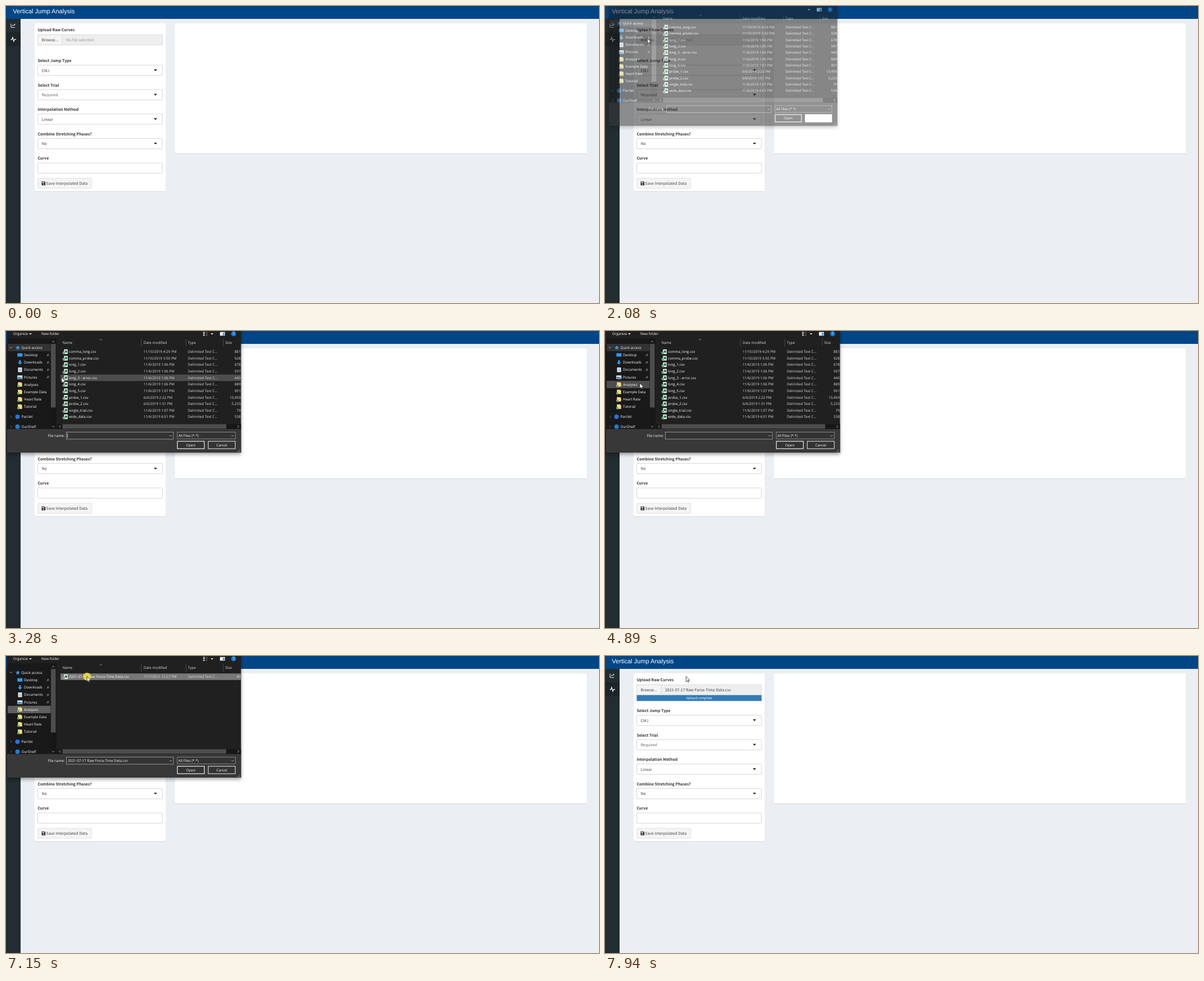
Write an HTML page that moves like this. It is 1056 by 530 pixels and loops after 8000 ms.

```html
<!DOCTYPE html>
<html lang="en">
<head>
<meta charset="utf-8">
<title>Vertical Jump Analysis</title>
<style>
html, body { margin: 0; height: 100%; overflow: hidden; background: #ebeff3; }
svg { display: block; }
text { text-rendering: geometricPrecision; white-space: pre; }
.title { font: 11.06px "Liberation Sans", Arial, sans-serif; fill: #fff; }
.form { font: 6.93px "Noto Sans CJK JP", "Noto Sans CJK SC", "Noto Sans", sans-serif; fill: #444; }
.label { font-weight: 700; fill: #333; }
.muted { fill: #999; }
.small { font-size: 5.85px; font-weight: 500; fill: #fff; }
.dlg { font: 6.3px "Open Sans", "Noto Sans", sans-serif; fill: #fff; }
.head { fill: #dedede; }
.end { text-anchor: end; }
.mid { text-anchor: middle; }
</style>
</head>
<body>
<svg id="stage" width="1056" height="530" viewBox="0 0 1056 530"></svg>
<script>
const $ = id => document.getElementById(id);
const rect = (x, y, w, h, fill, extra = '') =>
  `<rect x="${x}" y="${y}" width="${w}" height="${h}" fill="${fill}" ${extra}/>`;
const text = (x, y, str, cls, extra = '') => `<text x="${x}" y="${y}" class="${cls}" ${extra}>${str}</text>`;
const line = (d, stroke, width = 0.8, extra = '') =>
  `<path d="${d}" fill="none" stroke="${stroke}" stroke-width="${width}" ${extra}/>`;
const shape = (d, fill, extra = '') => `<path d="${d}" fill="${fill}" ${extra}/>`;
const dot = (x, y, r, fill, extra = '') => `<circle cx="${x}" cy="${y}" r="${r}" fill="${fill}" ${extra}/>`;
const group = (id, body, extra = '') => `<g id="${id}" ${extra}>${body}</g>`;
const border = c => `stroke="${c}" stroke-width=".8"`;

// Page
const card = (x, y, w, h) => rect(x, y + 1, w, h, '#d5dade', 'rx="1.5"') + rect(x, y, w, h, '#fff', 'rx="1.5"');
const select = (y, label, value, cls = '') =>
  text(56.4, y - 5.6, label, 'form label') +
  rect(56.5, y, 222, 18.4, '#fff', border('#ccc') + ' rx="1"') +
  text(63.5, y + 12, value, 'form', cls) +
  (value && shape(`M263.2 ${y + 7.5}h6l-3 3.2z`, '#222'));

const page =
  rect(0, 0, 1056, 530, '#ebeff3') +
  rect(0, 23, 26, 507, '#222d32') + rect(0, 47, 26, 24.5, '#1c2529') +
  rect(0, 0, 1056, 23, '#004687') +
  text(12.3, 13, 'Vertical Jump Analysis', 'title') +
  line('M8.8 31.5V38.3H16M10.2 36l2-2 1.5 1.3 2-2.8m-1.7 0h1.7v1.7', '#fff', 0.9) +
  line('M8.5 59.8h2l1.4-3.8 2 7 1.3-3.4h2.8', '#fff', 1.2) +
  card(51, 31, 233.5, 299.5) + card(301, 31, 733, 232) +
  text(56.4, 45.3, 'Upload Raw Curves', 'form label') +
  rect(56.5, 51.2, 222, 18.2, '#eee', border('#d2d6de')) +
  rect(56.5, 51.2, 43.3, 18.2, '#f4f4f4', border('#d5d5d5') + ' id="browse"') +
  text(63.5, 63, 'Browse...', 'form') +
  text(107, 63, '', 'form', 'id="chosen"') +
  group('progress', rect(56.3, 69.5, 222.5, 11, '#f5f5f5') +
    `<svg id="bar" x="56.3" y="69.5" height="11" overflow="hidden">` +
    rect(0, 0, 223, 11, '#337ab7') + text('50%', 7.6, 'Upload complete', 'form small mid') + '</svg>') +
  select(105.6, 'Select Jump Type', 'CMJ') +
  select(149.2, 'Select Trial', 'Required', 'opacity=".8"') +
  select(192.8, 'Interpolation Method', 'Linear') +
  select(236.4, 'Combine Stretching Phases?', 'No') +
  select(280, 'Curve', '') +
  rect(56.5, 307.2, 96.3, 18.2, '#f4f4f4', border('#ddd') + ' rx="1.5"') +
  shape('M63.5 313h5.2l1.5 1.5v5.5h-6.7z', '#333') +
  rect(64.7, 313.9, 3.3, 1.8, '#f4f4f4') + dot(66.8, 317.9, 1, '#f4f4f4') +
  text(71.5, 318.9, 'Save Interpolated Data', 'form');

// File dialog
const TOP = 31.2, ROW = 11.62, SIDE_TOP = 22.9, SIDE_ROW = 13.2;
const fileRow = ([name, date, size], i) => {
  const y = 37 + ROW * i;
  return rect(103.3, y - 4.2, 6.6, 8.2, '#f4f4f4') + rect(104.8, y - 2.3, 4, 4, '#1f7a45') +
    dot(103, y + 2, 2, '#2fa84f', 'stroke="#fff" stroke-width=".5"') +
    text(112, y + 2.2, name + '.csv', 'dlg') + text(245, y + 2.2, date + ' PM', 'dlg head') +
    text(324, y + 2.2, 'Delimited Text C...', 'dlg head') + text(417.8, y + 2.2, size, 'dlg head end');
};
const exampleFiles = [
  ['comma_long', '11/10/2019 4:29', '881'], ['comma_probe', '11/10/2019 3:50', '928'],
  ['long_1', '11/6/2019 1:06', '678'], ['long_2', '11/6/2019 1:06', '597'],
  ['long_3 - error', '11/6/2019 1:06', '440'], ['long_4', '11/6/2019 1:06', '889'],
  ['long_5', '11/6/2019 1:07', '901'], ['probe_1', '6/6/2019 2:22', '13,459'],
  ['probe_2', '6/6/2019 1:51', '5,233'], ['single_trial', '11/6/2019 1:07', '79'],
  ['wide_data', '11/6/2019 6:01', '538']];
const rawName = '2021-07-17 Raw Force-Time Data';
const rawFiles = [[rawName, '7/17/2021 12:27', '40']];

const folder = y => shape(`M21.2 ${y - 4}h5.5l2 1.5v6.3h-7.5z`, '#f6d87e') +
  dot(22.3, y + 2.4, 1.9, '#2fa84f', 'stroke="#fff" stroke-width=".5"');
const sideIcons = [
  y => shape(`M21 ${y - 4}l1.2 2.7 3 .3-2.3 2 .7 2.9-2.6-1.6-2.6 1.6.7-2.9-2.3-2 3-.3z`, '#2f9bf0'),
  y => rect(20.3, y - 3, 9, 6, '#2f9bf0'),
  y => shape(`M23.4 ${y - 4}h3v4h2.5l-4 4.2-4-4.2h2.5z`, '#2f9bf0'),
  y => rect(21.5, y - 4, 7, 8.3, '#eee') + line(`M23 ${y - 1.8}h4m-4 1.9h4m-4 1.9h4`, '#4b8fc8', 0.7),
  y => rect(20.3, y - 3, 9, 6.4, '#eee') + shape(`M21 ${y + 2.7}v-2l2.5-2 2.3 2 1-1 1.8 1.5v1.5z`, '#2f8fd8'),
  folder, folder, folder, folder];
const sideNames = ['Quick access', 'Desktop', 'Downloads', 'Documents', 'Pictures',
  'Analyses', 'Example Data', 'Heart Rate', 'Tutorial'];
const sideItem = (name, i) => {
  const y = SIDE_TOP + SIDE_ROW * (i + 0.5);
  return sideIcons[i](y) + text(i ? 32 : 27.3, y + 2.2, name, 'dlg') +
    (i > 0 && i < 5 ? line(`M72.5 ${y + 2.4}l2-2m-1.4-1.1l2.6 2.6m-1.5-3.6l2.5 2.5m-2.2-1.3l1.3-1.3`, '#aaa') : '');
};
const cloud = (y, name, color) => line(`M8 ${y - 2}l2 2-2 2`, '#777') +
  dot(20.5, y, 4, color) + text(27.5, y + 2.3, name, 'dlg');
const down = (x, y, c = '#ccc') => line(`M${x - 2} ${y - 1}l2 2 2-2`, c);
const button = (x, label, stroke, id = '') =>
  rect(x, 196.8, 48, 13.2, '#333', `stroke="${stroke}" stroke-width="1.1" ${id}`) +
  text(x + 24, 205.5, label, 'dlg mid');

const dialog =
  rect(2, -20, 416.5, 237, '#202020', 'style="filter:drop-shadow(0 3px 3px rgba(0,0,0,.4))"') +
  rect(2, 13, 88, 162, '#191919') +
  group('toolbar', text(12.8, 7.3, 'Organize', 'dlg') + shape('M41 4h5l-2.5 2.7z', '#ddd') +
    text(63, 7.3, 'New folder', 'dlg') +
    line('M351 2.5h3m-3 2.6h3m-3 2.6h3', '#eee', 1.5) + line('M355.5 2.5h3.5m-3.5 2.6h3.5m-3.5 2.6h3.5', '#888', 0.8)) +
  shape('M364.5 4h5l-2.5 2.7z', '#ddd') +
  rect(381, 1.8, 9, 6.5, '#eee') + rect(386, 3.4, 3.3, 4.2, '#2f9bf0') +
  dot(405.3, 5, 4.4, '#1080e0') + text(405.3, 7.4, '?', 'dlg mid', 'font-weight="700"') +
  line('M167 16.3l2-1.8 2 1.8', '#aaa') +
  line('M241 14v13.5M320.5 14v13.5M387 14v13.5', '#555') +
  [[100.5, 'Name'], [245, 'Date modified'], [324, 'Type'], [390.5, 'Size']]
    .map(([x, s]) => text(x, 23.2, s, 'dlg head')).join('') +
  rect(3, 0, 76.5, SIDE_ROW, '#333', 'id="sideMark"') +
  rect(3, 0, 76.5, SIDE_ROW, '#4d4d4d', 'id="sideHover"') +
  line('M6.5 28.3l2.2 2.2 2.2-2.2', '#ccc') +
  sideNames.map(sideItem).join('') +
  cloud(153, 'Parclet', '#1d74e8') + cloud(170.7, 'OurShelf', '#1480d8') +
  rect(80, 14, 8.5, 161, '#171717') + rect(80, 23, 8.5, 113.5, '#4d4d4d') +
  line('M82 20l2.2-2 2.2 2', '#ccc') + down(84.2, 170.5) +
  rect(97, 0, 321.5, ROW, '#4d4d4d', 'id="rowHover"') +
  group('examples', exampleFiles.map(fileRow).join('')) +
  group('raw', rawFiles.map(fileRow).join('')) +
  rect(91, 166, 327.5, 9, '#171717') + rect(100.7, 166.3, 291.5, 8, '#4d4d4d') +
  line('M97 168.2l-2 2.2 2 2.2M412.5 168.2l2 2.2-2 2.2', '#ccc') +
  rect(2, 175, 416.5, 42, '#383838') +
  text(104.5, 188.8, 'File name:', 'dlg end') +
  rect(107.5, 180.4, 190.5, 12.6, '#333', border('#aaa')) + down(293.3, 187) +
  text(110, 188.9, rawName + '.csv', 'dlg', 'id="typed"') +
  rect(109.2, 182.8, 0.8, 8, '#fff', 'id="caret"') +
  rect(305, 180.4, 103.5, 12.2, '#333', border('#999')) + down(403.5, 187) +
  text(307, 188.9, 'All Files (*.*)', 'dlg') +
  button(305.2, 'Open', '#fff') + button(360.2, 'Cancel', '#ddd') +
  rect(359.5, 196.2, 49.3, 14.4, '#fff', 'id="blank"') +
  line('M412 215.5h4.5m-2.3-2h2.3m-.8-2h.8', '#aaa', 1, 'stroke-dasharray="1 .8"');

$('stage').innerHTML = page + group('dialog', dialog) +
  dot(0, 0, 7, '#f3e03c', 'id="click" opacity=".85"') +
  shape('M0 0V9.6L2.2 7.6 3.6 10.8 5 10.2 3.7 7.1H6.7Z', '#fff', 'id="cursor" stroke="#111" stroke-width=".7"');

// Motion
const clamp = v => Math.min(1, Math.max(0, v));
const smooth = p => p * p * (3 - 2 * p);
const within = (t, a, b) => t >= a && t < b;
const show = (id, on) => $(id).setAttribute('visibility', on ? 'visible' : 'hidden');
const put = (id, attrs) => { for (const k in attrs) $(id).setAttribute(k, attrs[k]); };

const path = [ // time, x, y of the pointer tip
  [890, 101, -12], [1270, 75.5, 57.5], [2880, 75.5, 57.5], [3280, 99, 83], [3680, 74, 114],
  [3750, 74, 114], [3980, 63, 111], [4500, 63, 111], [4690, 110, 31], [4890, 62, 93],
  [5010, 43, 96], [6060, 43, 96], [6290, 140, 50], [6390, 140, 50], [6610, 144.3, 36.3]];

function pointer(t) {
  const i = path.findIndex(p => p[0] > t);
  if (i < 1) return path[i ? path.length - 1 : 0].slice(1);
  const [a, b] = [path[i - 1], path[i]];
  const p = smooth((t - a[0]) / (b[0] - a[0]));
  return [a[1] + (b[1] - a[1]) * p, a[2] + (b[2] - a[2]) * p];
}

function draw(t) {
  const [x, y] = pointer(t);
  put('cursor', { transform: `translate(${x} ${y})` });
  put('click', { cx: x, cy: y + 0.5 });
  show('click', within(t, 1570, 1770) || within(t, 5360, 5560) || within(t, 7150, 7520));

  const overBrowse = y > 51 && t < 2280;
  put('browse', { fill: within(t, 1570, 1770) ? '#d6d6d6' : overBrowse ? '#e7e7e7' : '#f4f4f4' });
  const uploaded = t >= 7320;
  $('chosen').textContent = uploaded ? rawName + '.csv' : 'No file selected';
  $('chosen').setAttribute('class', uploaded ? 'form' : 'form muted');
  show('progress', uploaded);
  put('bar', { width: 222.5 * smooth(clamp((t - 7390) / 540)) });

  const alpha = uploaded ? (1 - clamp((t - 7320) / 130)) ** 2 : 1 - (1 - clamp((t - 2030) / 160)) ** 2;
  const scale = 1 - 0.05 * (1 - alpha);
  put('dialog', { opacity: alpha, transform: `translate(210 72) scale(${scale}) translate(-210 -72)` });
  const settled = t >= 2110;
  show('dialog', alpha > 0);
  for (const id of ['toolbar', 'blank']) show(id, alpha > 0 && settled === (id === 'toolbar'));

  const open = alpha > 0, chosen = t >= 5560, loaded = t >= 5680;
  show('examples', open && t < 5620);
  show('raw', open && loaded);
  put('sideMark', { y: SIDE_TOP + (chosen ? 5 * SIDE_ROW : 0), fill: chosen ? '#5f5f5f' : '#333' });

  const side = Math.floor((y - SIDE_TOP) / SIDE_ROW);
  put('sideHover', { y: SIDE_TOP + side * SIDE_ROW });
  show('sideHover', within(t, 2200, 5560) && x < 79.5 && within(side, 0, 9));
  const row = Math.floor((y - TOP) / ROW);
  const picked = t >= 7150;
  put('rowHover', { y: TOP + row * ROW, fill: picked ? '#777' : '#4d4d4d' });
  show('rowHover', open && x >= 97 && within(row, 0, loaded ? 1 : 11));

  show('typed', open && picked);
  show('caret', within(t, 2100, 5670) && Math.floor((t - 2100) / 510) % 2 === 0);
}

(function tick() {
  draw(performance.now() % 8000);
  requestAnimationFrame(tick);
})();
</script>
</body>
</html>
```
